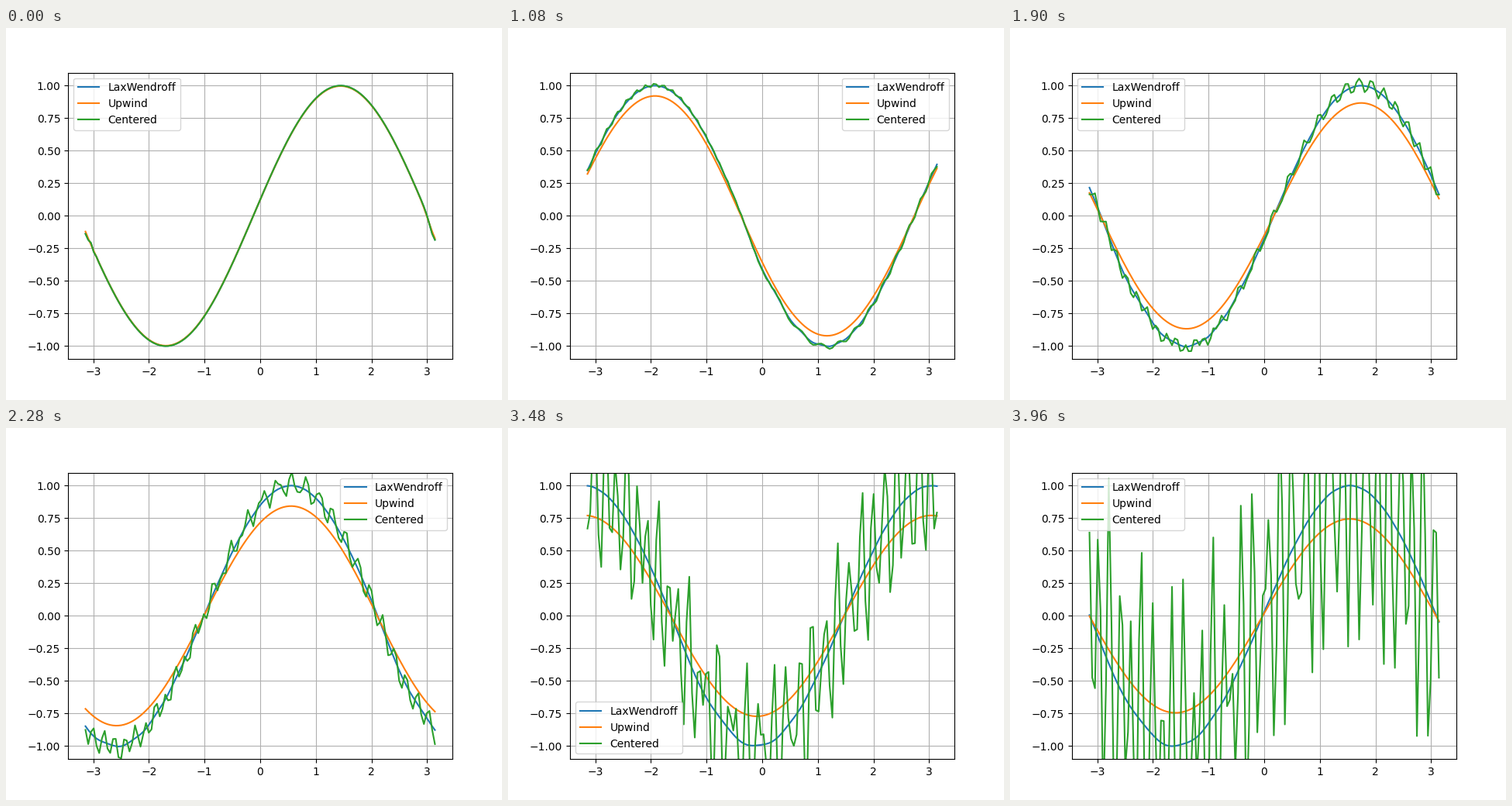
Animation of 640x480 px, one loop 3.98 s. Source, as a matplotlib script:

```python
"""Advection of a sine wave with three finite-difference schemes."""
import numpy as np
import matplotlib.pyplot as plt
from matplotlib.animation import FuncAnimation

FRAMES, INTERVAL = 199, 20
NX = 128
DT = 0.0025
STEPS = 25          # time steps per frame
LEAD = 2 * STEPS    # steps already done when the loop begins

x = np.linspace(-np.pi, np.pi, NX)
cfl = DT / (x[1] - x[0])

# Every scheme is the centered one plus its own amount of diffusion.
schemes = {"LaxWendroff": cfl**2 / 2, "Upwind": cfl / 2, "Centered": 0.0}
diffusion = np.array(list(schemes.values()))[:, None]


def advance(u, steps):
    """Move the wave to the left, with periodic ghost points at both ends."""
    for _ in range(steps):
        left, mid, right = u[:, :-2], u[:, 1:-1], u[:, 2:]
        new = np.empty_like(u)
        new[:, 1:-1] = (mid + cfl / 2 * (right - left)
                        + diffusion * (right - 2 * mid + left))
        new[:, 0] = new[:, -2]
        new[:, -1] = new[:, 1]
        u = new
    return u


states = [advance(np.tile(np.sin(x), (len(schemes), 1)), LEAD)]
while len(states) < FRAMES:
    states.append(advance(states[-1], STEPS))

fig, ax = plt.subplots(figsize=(6.4, 4.8), dpi=100)
lines = [ax.plot(x, u, label=name)[0] for name, u in zip(schemes, states[0])]
ax.set_xlim(-1.1 * np.pi, 1.1 * np.pi)
ax.set_ylim(-1.1, 1.1)
ax.grid()
ax.legend(loc="best")


def update(frame):
    for line, u in zip(lines, states[frame]):
        line.set_ydata(u)
    return lines


anim = FuncAnimation(fig, update, frames=FRAMES, interval=INTERVAL,
                     repeat=True, repeat_delay=0, blit=False)
plt.show()
```
